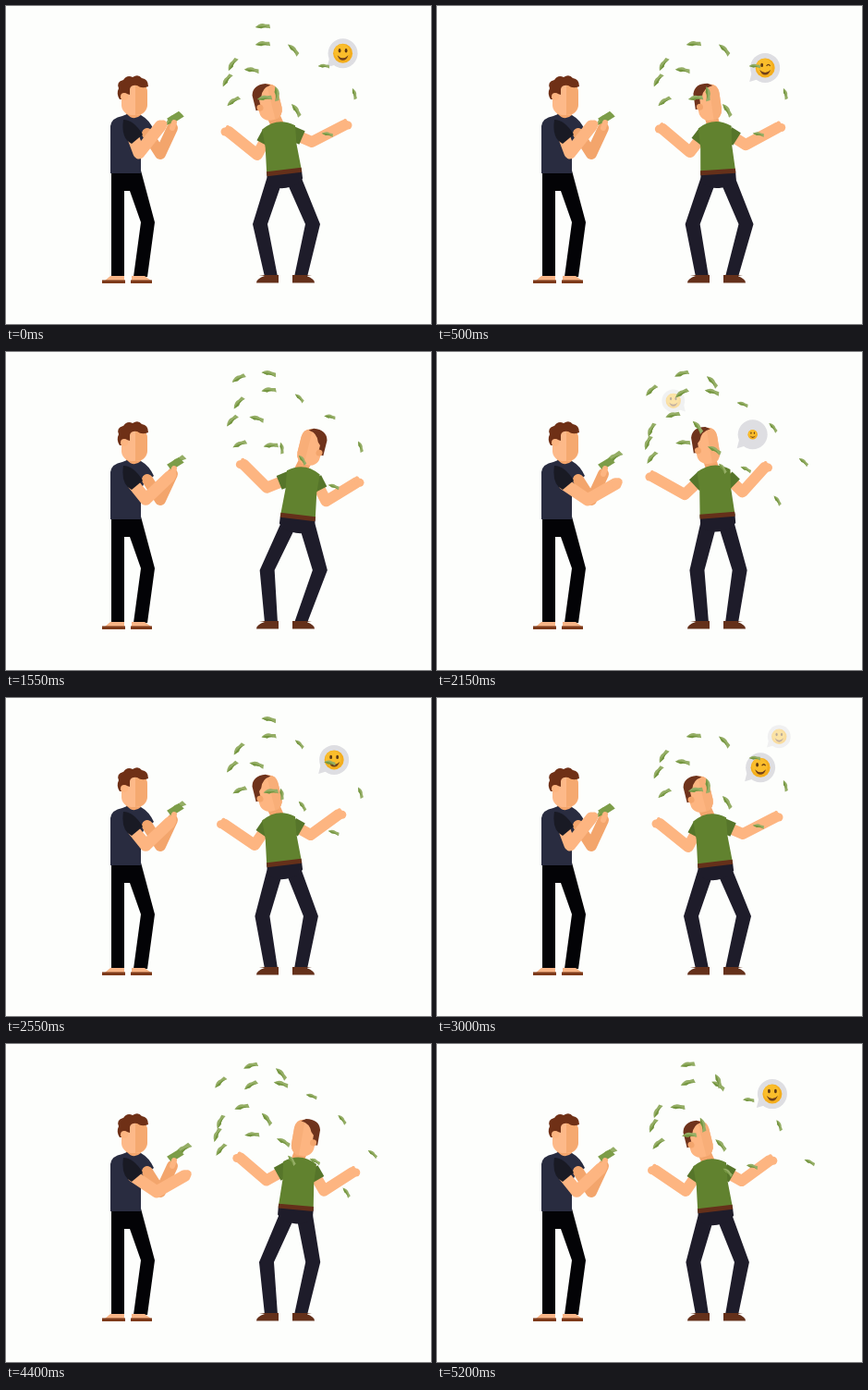
Recreate the animation shown at these times as an HTML page. Size 460 px wide and 344 px high, loop 5250 ms.

```html
<!DOCTYPE html>
<html>
<head>
<meta charset="utf-8">
<style>
html, body { margin: 0; width: 100%; height: 100%; overflow: hidden; background: #fdfefc; }
svg { display: block; width: 100vw; height: 100vh; }
</style>
</head>
<body>
<svg viewBox="0 0 460 344">
  <g id="thrower">
    <path d="M114 178H146L161 234 153 293H138L146 234 134 200H128V293H114Z" fill="#030306"/>
    <path d="M107 297L113 292H128V297ZM136 297V292H150L157 297Z" fill="#f7b486"/>
    <path d="M104 296.500H129V300H104ZM135 296.500H158V300H135Z" fill="#7d3a1a"/>
    <path d="M130 104H146V121Q138 129 130 121Z" fill="#f3a56c"/>
    <path d="M113 181V130Q114 121 126 119L131 117Q138 125 146 118Q155 123 160 134L149 143 146 150V181Z" fill="#292c40"/>
    <rect x="125" y="82" width="28" height="36" rx="11" fill="#fdb989"/>
    <path d="M140 84H147Q153 86 153 95V107Q151 118 140 118Z" fill="#f5a970"/>
    <path d="M123 101Q119 95 122 89Q119 82 127 80Q131 74 137 77Q143 73 147 78Q154 79 154 87Q147 90 142 86Q135 85 134 90V96Q130 94 129 97V101Z" fill="#6f3016"/>
    <circle cx="128" cy="98" r="4" fill="#fdb581"/>
  </g>
  <g id="moving"></g>
</svg>
<script>
const LOOP = 5250, STEP = 50, BEAT = 250, BEATS = LOOP / BEAT;
const SKIN = '#fdb581', SHADE = '#f3a56c', SHIRT = '#61822f', SLEEVE = '#56752a', JEANS = '#1e1c2a';
const moving = document.getElementById('moving');
const mix = (a, b, k) => a + (b - a) * k;
const clamp = (v, lo, hi) => Math.max(lo, Math.min(hi, v));
const mixPoint = (p, q, k) => [mix(p[0], q[0], k), mix(p[1], q[1], k)];
const line = (points, width, color, cap = 'round') =>
  `<polyline points="${points.join(' ')}" fill="none" stroke="${color}" stroke-width="${width}" stroke-linejoin="round" stroke-linecap="${cap}"/>`;

function bill(x, y, angle, size) {
  return `<g transform="translate(${x} ${y}) rotate(${angle}) scale(${size})">
    <path d="M-9 1Q-3 -5 3 -2.500L8 -2.500 9 2.500Q2 0 -2 2.500Z" fill="#95ae66"/>
    <path d="M-9 1Q-3 -1 3 0L9 2.500Q2 0 -2 2.500Z" fill="#73953f"/></g>`;
}

// Every beat throws one bill along each arc; ages are in beats.
const ARCS = [
  { top: 41, peak: 2, rise: 22, fall: 6, drift: 33, life: 6 },
  { top: 68, peak: 1.7, rise: 25, fall: 16, drift: 27, life: 4 },
  { top: 98, peak: 1.5, rise: 20, fall: 6.5, drift: 34, life: 4.8 },
  { top: 22, peak: 2, rise: 10, fall: 28, drift: 33, life: 3, high: true }
];
// High throws pause while the dancer leans furthest left.
const throwsHigh = n => Math.cos(4 * Math.PI * n / BEATS) < .6;

function flyingBills(beat) {
  let out = '';
  for (const arc of ARCS) {
    for (let n = Math.floor(beat); beat - n < arc.life; n--) {
      const age = beat - n, past = age - arc.peak;
      if (age < .55 || arc.high && !throwsHigh(n)) continue;
      const bend = past < 0 ? arc.rise : arc.fall;
      const slope = Math.atan2(2 * bend * past, arc.drift) * 180 / Math.PI;
      const flutter = -30 * Math.cos(Math.PI * age) * clamp(past, 0, 1);
      out += bill(212 + arc.drift * age, arc.top + bend * past * past, slope + flutter, age > 3 ? .7 : .9);
    }
  }
  return out;
}

const BUBBLES = [
  { start: 50, face: 'wink' }, { start: 2100, face: 'smile' },
  { start: 2700, face: 'wink' }, { start: 4520, face: 'smile' },
  { start: 750, face: 'heart', left: true }, { start: 1580, face: 'smile', left: true },
  { start: 3160, face: 'heart', left: true }
];

function emoji(kind) {
  const eye = x => kind === 'heart'
    ? `<path d="M${x} -.5L${x - 3} -4Q${x - 2} -7 ${x} -4.500Q${x + 2} -7 ${x + 3} -4Z" fill="#e23b32"/>`
    : kind === 'wink' && x > 0
      ? `<path d="M${x - 2} -2Q${x} -5 ${x + 2} -2" fill="none" stroke="#6b3f13" stroke-width="1.3"/>`
      : `<ellipse cx="${x}" cy="-3" rx="1.400" ry="2.200" fill="#5d3712"/>`;
  return `<circle r="10.500" fill="#f4ae1d"/><circle cx="-1" cy="-1.500" r="8.500" fill="#fabd2b"/>
    ${eye(-3.5)}${eye(3.5)}<path d="M-6 2Q0 8 6 2Q4 7.500 0 7.500T-6 2Z" fill="#70401a"/>`;
}

function bubble(t, { start, face, left }) {
  const age = (t - start + LOOP) % LOOP, k = age / (left ? 600 : 950);
  if (k >= 1) return '';
  const [x, y] = left ? [290 - 36 * k, 88 - 37 * k] : [340 + 32 * k, 92 - 53 * k];
  const fade = clamp((1 - k) * 5, 0, 1), grow = clamp((age + 50) / 200, 0, 1);
  const side = left ? 1 : -1;
  return `<g transform="translate(${x} ${y}) scale(${mix(.7, 1, fade)})" opacity="${mix(.2, 1, fade)}">
    <circle r="16" fill="#dedee2"/><path d="M${side * 7} 12L${side * 17} 15 ${side * 14} 3Z" fill="#dedee2"/>
    <g transform="scale(${grow})">${emoji(face)}</g></g>`;
}

function throwing(reach) {
  const elbow = mixPoint([144, 159], [165, 160], reach);
  const hand = mixPoint([167, 130], [196, 144], reach);
  const far = [180, 132];
  return line([[153, 138], [167, 160], far], 12, SHADE) +
    bill(mix(181, 192, reach), mix(122, 114, reach), -35, 1.2) +
    `<path transform="translate(183 121) rotate(-32)" d="M-8 -4H7L9 4H-7Z" fill="#7c9d48"/>` +
    line([far, [182, 126]], 6, SKIN) +
    line([[138, 143], elbow, hand], 13, SKIN) + line([hand, [hand[0] + 3, hand[1] - 2]], 9, SKIN) +
    `<path d="M127 123Q138 123 148 139L136 149Q124 143 127 123Z" fill="#191a24"/>`;
}

function arm(shoulder, elbow, hand, dir) {
  const cuff = mixPoint(shoulder, elbow, .5);
  return line([shoulder, elbow, hand], 12, SKIN) +
    line([hand, [hand[0] + 4 * dir, hand[1]]], 9, SKIN) +
    line([hand, [hand[0] + dir, hand[1] - 5]], 4, SKIN) +
    line([shoulder, cuff], 16, SLEEVE, 'butt');
}

function leg(hip, knee, foot) {
  return `<path d="M${hip - 9} 184H${hip + 9}L${knee + 8} 236 ${foot + 7} 293H${foot - 7}L${knee - 8} 236Z" fill="${JEANS}"/>`;
}

function shoe(x, dir) {
  return `<path transform="translate(${x} 0) scale(${dir} 1)" d="M-11 291H10V299.500H-14Q-14 295 -5 292Z" fill="#64301a"/>`;
}

function dancer(sway, bounce) {
  const side = (sway + 1) / 2, dip = 3 * bounce - 1;
  const hip = mix(301, 316, side), chest = mix(297, 321, side);
  // Blend a joint between its left/right sway and high/low bounce places.
  const joint = (leftHigh, leftLow, rightHigh, rightLow) =>
    mixPoint(mixPoint(leftHigh, leftLow, bounce), mixPoint(rightHigh, rightLow, bounce), side);
  const handL = joint([228, 138], [241, 136], [258, 121], [257, 122]);
  const handR = joint([348, 121], [366, 129], [379, 142], [379, 141]);
  const elbowL = joint([264, 155], [272, 161], [285, 146], [281, 147]);
  const elbowR = joint([327, 150], [331, 147], [347, 160], [346, 162]);
  const head = [307 + 24 * sway, 103 + dip], neck = [mix(294, 319, side), 127 + dip];
  return leg(hip + 9, 329 + 3 * sway + bounce * (9 + 3 * sway), 319) +
    leg(hip - 9, 282 + bounce * (4 * sway - 3), 287) + shoe(285, 1) + shoe(320, -1) +
    arm([chest - 12, 135 + dip], elbowL, handL, -1) + arm([chest + 13, 136 + dip], elbowR, handR, 1) +
    line([head, neck], 14, SHADE) +
    `<g transform="translate(${hip} ${177 + dip}) rotate(${7 * sway})">
      <path d="M-19 0H19V10Q14 18 0 18T-19 10Z" fill="${JEANS}"/>
      <path d="M-19 1L-17 -28 -18 -48Q0 -60 18 -48L17 -28 19 1Z" fill="${SHIRT}"/>
      <path d="M-19 -2H19V3H-19Z" fill="#65301a"/></g>
    <g transform="translate(${head}) rotate(${14 * sway}) scale(${-Math.sign(sway) || 1} 1)">
      <rect x="-11" y="-20" width="25" height="39" rx="11" fill="${SKIN}"/>
      <path d="M4 -20Q14 -19 14 -9V8Q13 19 4 19Z" fill="#f8ae78"/>
      <path d="M-14 5V-12Q-11 -23 3 -21L8 -18Q-2 -17 -5 -8L-8 -5V5Z" fill="#6f331c"/>
      <circle cx="-9" cy="3" r="3.500" fill="${SHADE}"/></g>`;
}

function draw(t) {
  const beat = t / BEAT;
  const sway = clamp(-1.6 * Math.cos(4 * Math.PI * t / LOOP), -1, 1);
  const bounce = (1 + Math.cos(2 * Math.PI * beat)) / 2;
  moving.innerHTML = throwing(1 - bounce) + dancer(sway, bounce) +
    BUBBLES.map(b => bubble(t, b)).join('') + flyingBills(beat);
}

function tick() {
  draw(Math.floor(performance.now() % LOOP / STEP) * STEP);
  requestAnimationFrame(tick);
}
tick();
</script>
</body>
</html>
```
